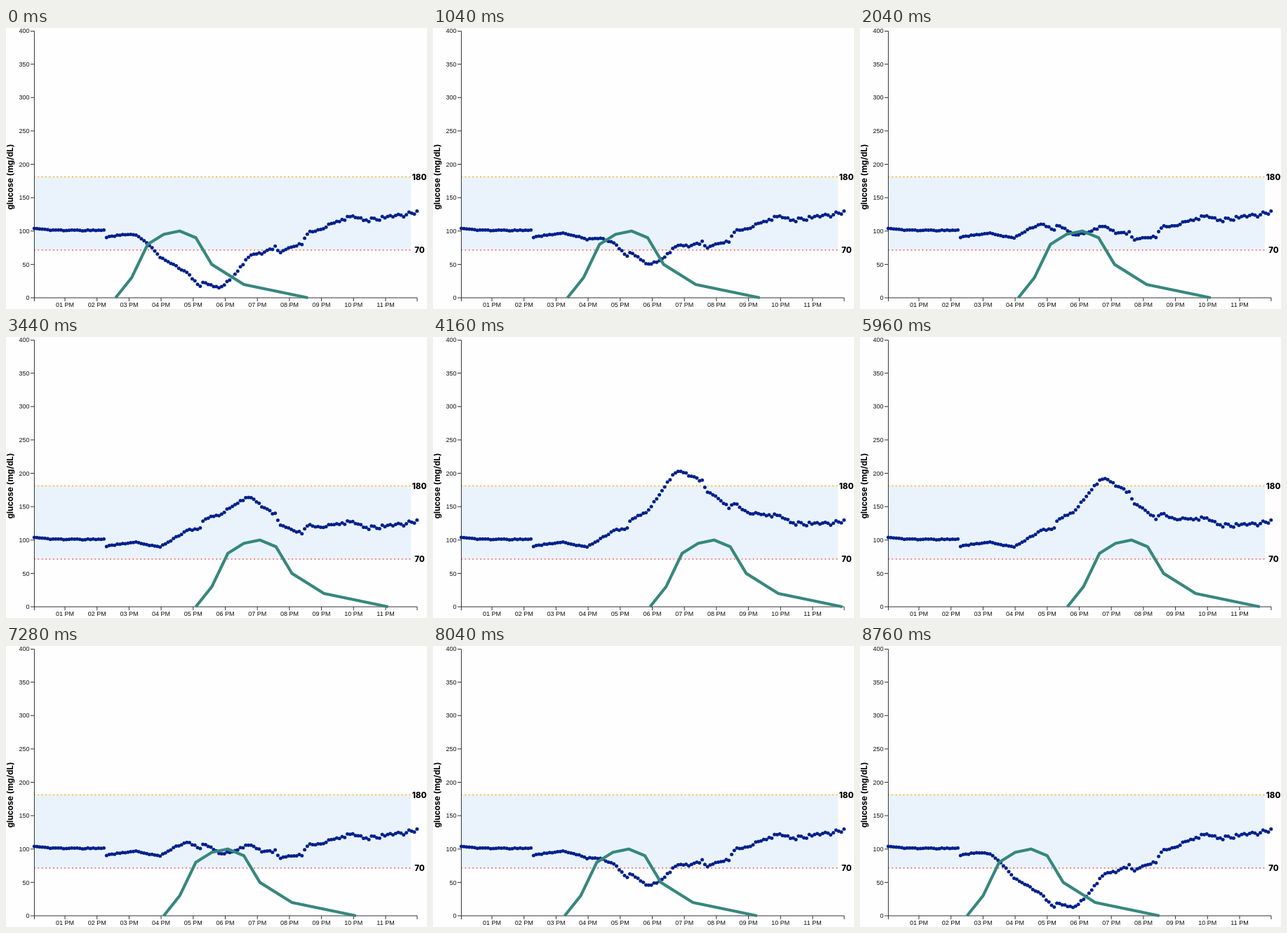
An HTML page with a canvas for the animation above (8.8 s loop, 600x401 px).

```html
<!DOCTYPE html>
<html>
<head>
<meta charset="utf-8">
<style>
  html, body { margin: 0; width: 100%; height: 100%; overflow: hidden; background: #fefefe; }
  canvas { display: block; }
</style>
</head>
<body>
<canvas width="600" height="401"></canvas>
<script>
const ctx = document.querySelector('canvas').getContext('2d');
const LOOP = 8800, FRAME = 40, HOUR = 45.7, DOTS = 144;
const LAG = .22;          // hours until a dose starts to act
const STRENGTH = 1.2;     // glucose drop per unit of dose and hour
const INK = '#333', NAVY = '#00208a', TEAL = '#37877d';

const xOf = hour => 38.3 + HOUR * hour;
const yOf = v => 385 - v * .9525;
const dotHour = i => .044 + i / 11.98;

// Dose start in hours, dragged to and fro over the loop (ms)
const drag = [[0, 2.58], [2040, 4.1], [3440, 5.08], [4600, 6.45], [5200, 6.62],
  [5520, 6.45], [5960, 5.63], [7280, 4.08], [8760, 2.5]];

// Dose activity by hours since its start
const dose = [[0, 0], [.5, 30], [1, 80], [1.5, 95], [2, 100], [2.5, 90], [3, 50], [4, 20], [6, 0]];

// Glucose without any dose, by dot
const undosed = [[0, 104], [7, 101], [26, 101], [27, 91], [37, 97], [47, 90], [57, 114], [62, 118],
  [63, 129], [70, 144], [76, 181], [80, 208], [86, 220], [90, 230], [92, 224], [100, 240],
  [102, 256], [113, 272], [118, 281], [125, 275], [136, 281], [143, 287]];

function lerpAt(points, x) {
  const i = points.findIndex(p => p[0] >= x);
  if (i === 0) return points[0][1];
  if (i < 0) return points[points.length - 1][1];
  const [x0, y0] = points[i - 1], [x1, y1] = points[i];
  return y0 + (y1 - y0) * (x - x0) / (x1 - x0);
}

// Area under the dose curve up to the given hour
function absorbed(hour) {
  let sum = 0;
  for (let i = 1; i < dose.length && dose[i - 1][0] < hour; i++) {
    const [h0, v0] = dose[i - 1], h1 = Math.min(hour, dose[i][0]);
    sum += (h1 - h0) * (v0 + lerpAt(dose, h1)) / 2;
  }
  return sum;
}

// Repeatable scatter from -1 to 1
function scatter(i) {
  const n = Math.sin(i * 12.9898 + 4) * 43758.5453;
  return 2 * (n - Math.floor(n)) - 1;
}

const baseline = Array.from({ length: DOTS }, (_, i) =>
  lerpAt(undosed, i) + scatter(i) * (.6 + 3 * (i / DOTS) ** 2));

const glucose = (i, start) => baseline[i] - STRENGTH * absorbed(dotHour(i) - start - LAG) / 2;

function line(color, width, points, dash = []) {
  ctx.strokeStyle = color;
  ctx.lineWidth = width;
  ctx.setLineDash(dash);
  ctx.beginPath();
  points.forEach(p => ctx.lineTo(...p));
  ctx.stroke();
}

function text(str, x, y, font, align = 'center') {
  ctx.font = font;
  ctx.textAlign = align;
  ctx.fillText(str, x, y);
}

function drawAxes() {
  const small = '9px "Liberation Sans", Arial, sans-serif';
  const bold = '800 11.5px Montserrat, Inter, sans-serif';
  line(INK, 1, [[35, 4.5], [40.4, 4.5], [40.4, 385], [35, 385]]);
  line(INK, 1, [[40.4, 390], [40.4, 385], [586, 385], [586, 390]]);
  ctx.fillStyle = '#111';
  for (let v = 0; v <= 400; v += 50) {
    const y = yOf(v);
    if (v % 400) line(INK, 1, [[35, y], [40, y]]);
    text(v, 33.5, y + 3.2, small, 'right');
  }
  for (let h = 1; h < 12; h++) {
    line(INK, 1, [[xOf(h), 385], [xOf(h), 390]]);
    text(String(h).padStart(2, '0') + ' PM', xOf(h), 398, small);
  }
  ctx.fillStyle = '#000';
  text('180', 589, 217, bold);
  text('70', 589.5, 321, bold);
  ctx.save();
  ctx.translate(10, 212.5);
  ctx.rotate(-Math.PI / 2);
  text('glucose (mg/dL)', 0, 0, '700 11.7px Montserrat, Inter, sans-serif');
  ctx.restore();
}

function draw() {
  const time = Math.floor(performance.now() % LOOP / FRAME) * FRAME;
  const start = lerpAt(drag, time);
  ctx.fillStyle = '#fefefe';
  ctx.fillRect(0, 0, 600, 401);
  ctx.fillStyle = '#eaf3fc';
  ctx.fillRect(40, 212, 537, 105);
  line('#ffb31a', 1.8, [[40, 212.4], [577, 212.4]], [1.8, 3.6]);
  line('#ff6b6b', 1.8, [[40, 316.8], [577, 316.8]], [1.8, 3.6]);
  drawAxes();
  ctx.fillStyle = NAVY;
  for (let i = 0; i < DOTS; i++) {
    ctx.beginPath();
    ctx.arc(xOf(dotHour(i)), yOf(glucose(i, start)), 2.5, 0, 7);
    ctx.fill();
  }
  line(TEAL, 4.2, dose.map(([h, v]) => [xOf(start + h), yOf(v)]));
  requestAnimationFrame(draw);
}
draw();
</script>
</body>
</html>
```
